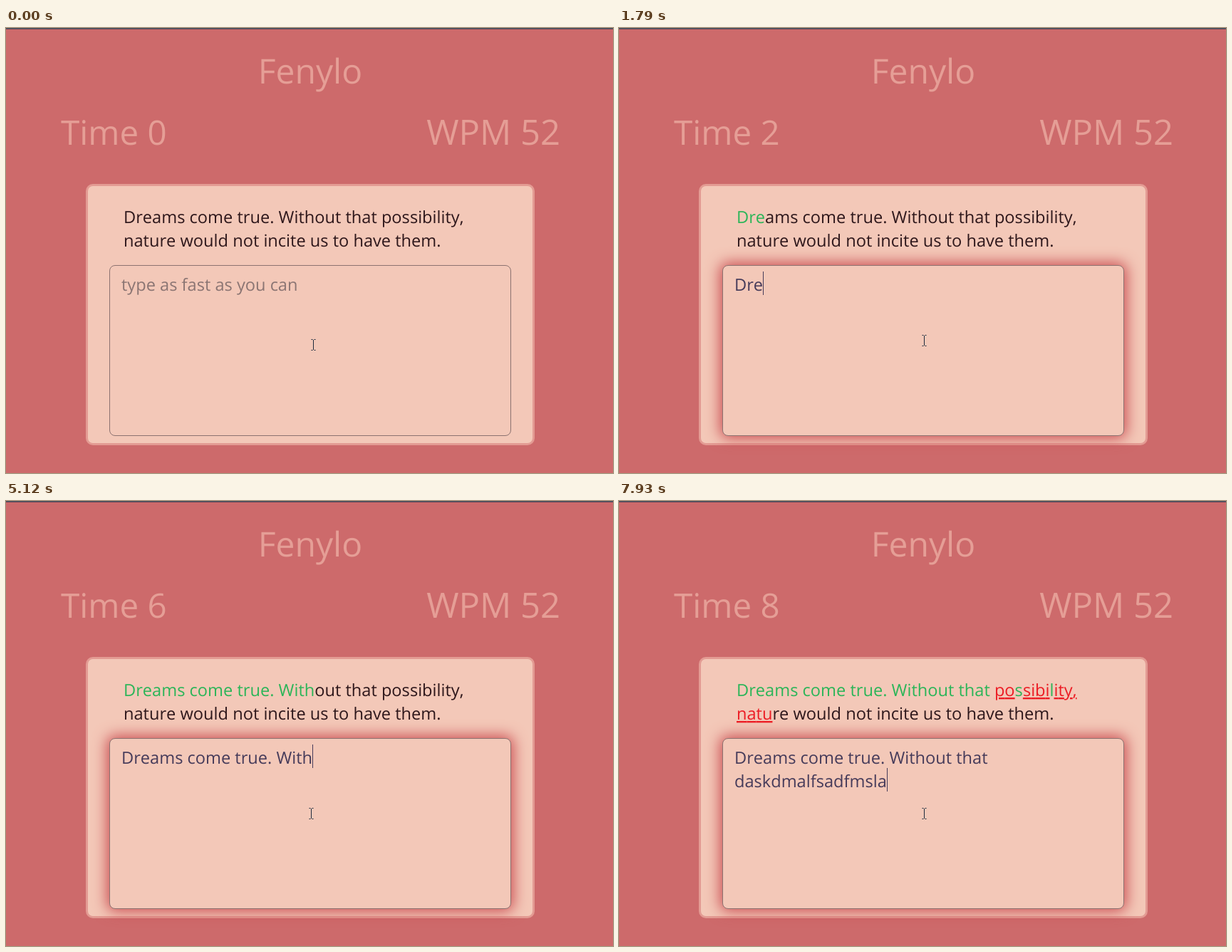
Animation of 852 by 625 pixels, one loop 8 s. Source, as an HTML page:

```html
<!DOCTYPE html>
<html lang="en">
<head>
<meta charset="utf-8">
<title>Typing test</title>
<style>
  html, body { margin: 0; width: 100%; height: 100%; overflow: hidden; background: #cd6a6b; }
  div, svg { position: absolute; box-sizing: border-box; }
  #strip { left: 0; top: 0; width: 852px; height: 2px; background: linear-gradient(#45535f 50%, #6d4a58 50%); }
  #card { left: 112px; top: 219px; width: 630px; height: 367px; border: 3px solid #e39b93; border-radius: 10px; background: #f3c8b8; }
  #box { left: 145px; top: 333px; width: 564px; height: 240px; border: 1px solid #8c7270; border-radius: 8px; background: #f3c8b8; }
  svg { left: 0; top: 0; }
  text {
    font: 23.6px "Open Sans", "Noto Sans", sans-serif;
    font-kerning: none; font-variant-ligatures: none;
    text-rendering: geometricPrecision; white-space: pre;
  }
  .head { fill: #e59e96; }
  .quote { fill: #2e171b; }
  .good { fill: #2bb558; }
  .bad { fill: #ec1c24; text-decoration: underline; }
  .typed { fill: #463b5a; }
  #hint { fill: #8b7573; }
</style>
</head>
<body>
<div id="strip"></div>
<div id="card"></div>
<div id="box"></div>
<svg width="852" height="625">
  <text class="head" x="427" y="78" text-anchor="middle" style="font-size:48px">Fenylo</text>
  <text class="head" id="time" x="77" y="164" style="font-size:47.5px"></text>
  <text class="head" x="778" y="164" text-anchor="end" style="font-size:49px">WPM 52</text>
  <text class="quote" x="165" y="274"></text>
  <text class="quote" x="165" y="307"></text>
  <text id="hint" x="162" y="369">type as fast as you can</text>
  <text class="typed" x="162" y="369"></text>
  <text class="typed" x="162" y="402"></text>
  <rect id="caret" width="1" height="33" fill="#463b5a"/>
  <path id="pointer" d="M-3 -7.5H-1M1 -7.5H3M0 -7V7M-3 7.5H-1M1 7.5H3" transform="translate(431.5 445)" fill="none" stroke="#1d2a3c"/>
</svg>
<script>
const LOOP = 8000, WRAP = 530;
const quote = ['Dreams come true. Without that possibility,', 'nature would not incite us to have them.'];
const goal = quote.join(' ');
const ticks = [70, 1070, 2110, 3110, 4050, 5080, 6060, 7080];

// [time, typed characters, how many of them are not yet marked in the quote]
const keys = [
  [1070, 'D'], [1240, 'r'], [1790, 'e'], [1860, 'a'], [2030, 'm'], [2110, 's', 1], [2190, ''], [2260, ' '],
  [2810, 'c'], [2890, 'o', 1], [2960, 'm', 1], [3040, 'e', 1], [3110, ''], [3190, ' '],
  [3500, 't'], [3580, 'r', 1], [3650, ''], [3730, 'u'], [3800, 'e', 1], [3880, ''], [4050, '.'], [4280, ' '],
  [4660, 'W', 1], [4740, ''], [4890, 'i'], [4970, 't', 1], [5040, 'h', 1], [5120, ''],
  [5290, 'o'], [5370, 'u', 1], [5440, ''], [5610, 't'], [5680, ' '],
  [5910, 't'], [5990, 'h', 1], [6060, 'a', 1], [6140, 't', 1], [6210, ''], [6290, ' '],
  [6920, 'd'], [7000, 'ask', 3], [7080, 'd', 2], [7150, 'm', 1], [7230, 'a', 1], [7310, 'l', 1], [7380, 'f', 1], [7460, ''],
  [7610, 'sad'], [7780, 'f'], [7850, 'm'], [7930, 'sla']
];

const $ = id => document.getElementById(id);
const quoteLines = document.querySelectorAll('.quote');
const typedLines = document.querySelectorAll('.typed');
const between = (t, a, b) => t >= a && t < b;

function markQuote(typed, marked) {
  let start = 0;
  quote.forEach((line, row) => {
    quoteLines[row].innerHTML = [...line].map((char, col) => {
      const i = start + col;
      const mark = i >= marked ? '' : typed[i] === goal[i] ? 'good' : 'bad';
      return `<tspan class="${mark}">${char}</tspan>`;
    }).join('');
    start += line.length + 1;
  });
}

function showTyped(typed) {
  const [first, second] = typedLines;
  first.textContent = typed;
  second.textContent = '';
  let row = 0;
  if (first.getComputedTextLength() > WRAP) {
    const cut = typed.lastIndexOf(' ') + 1;
    first.textContent = typed.slice(0, cut);
    second.textContent = typed.slice(cut);
    row = 1;
  }
  const width = typed ? typedLines[row].getComputedTextLength() : 0;
  $('caret').setAttribute('x', Math.round(162 + width));
  $('caret').setAttribute('y', 342 + 33 * row);
}

let shown = -1;
function draw(t) {
  const past = keys.filter(key => key[0] <= t);
  if (past.length !== shown) {
    shown = past.length;
    const typed = past.map(key => key[1]).join('');
    markQuote(typed, typed.length - (shown && past[shown - 1][2] || 0));
    showTyped(typed);
    $('hint').style.display = typed ? 'none' : '';
  }
  $('time').textContent = 'Time ' + ticks.filter(tick => tick <= t).length;

  // The box gains focus in four steps while the pointer settles.
  const focus = Math.max(0, Math.min(4, Math.floor((t - 140) / 80))) / 4;
  $('box').style.boxShadow = `0 0 20px 3px rgba(201, 74, 79, ${focus})`;
  $('pointer').setAttribute('transform', `translate(${Math.round(431 - 3 * focus) + .5} ${Math.round(445 - 6 * focus)})`);

  const visible = t >= 300 && !between(t, 770, 1070) && !between(t, 6770, 6920);
  $('caret').style.display = visible ? '' : 'none';
}

const begin = performance.now();
function frame() {
  draw((performance.now() - begin) % LOOP);
  requestAnimationFrame(frame);
}
frame();
</script>
</body>
</html>
```
